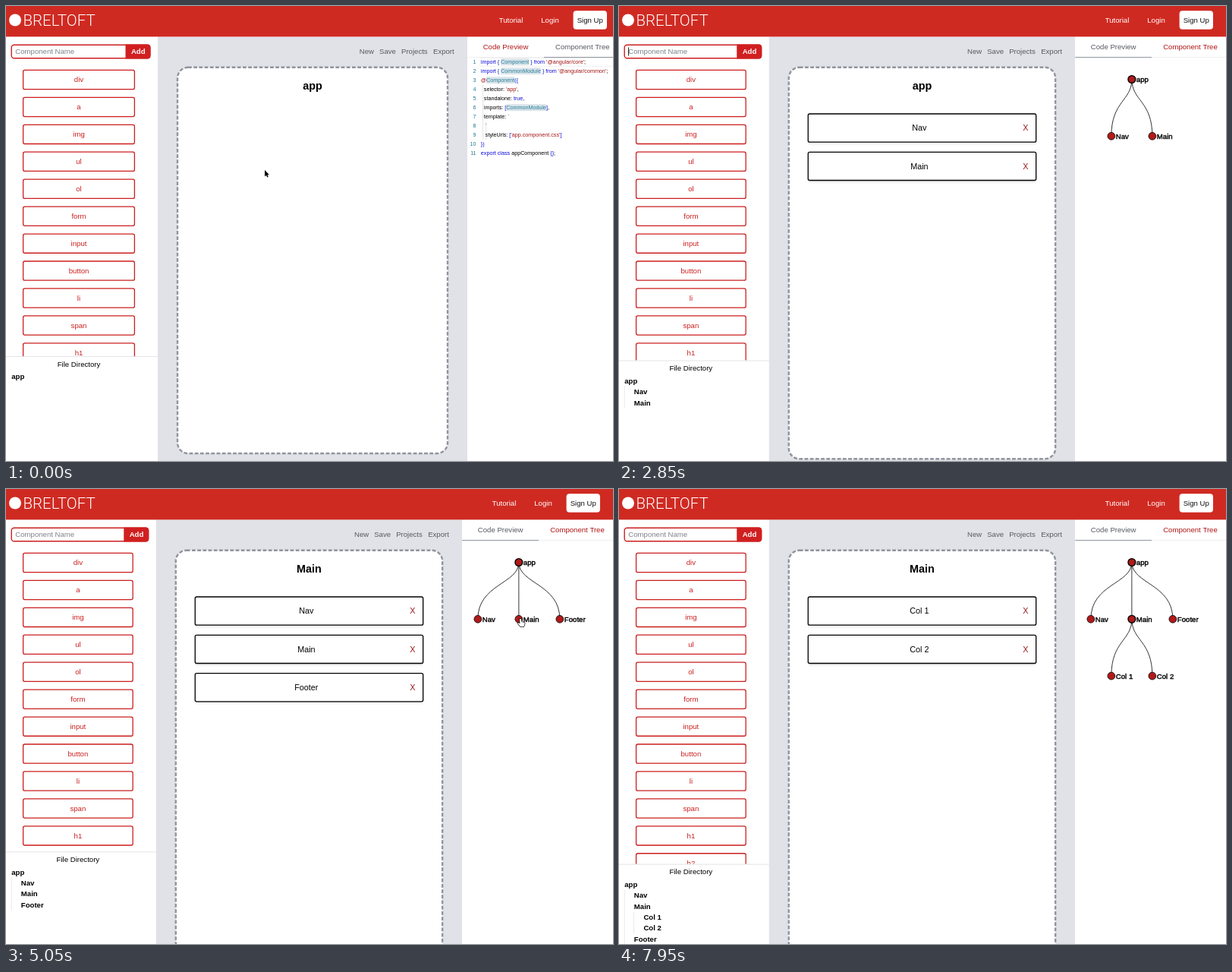
Recreate the animation shown at these times as an HTML page with a canvas. Size 800 by 599 pixels, loop 8 s.

```html
<!DOCTYPE html>
<html lang="en">
<head>
<meta charset="utf-8">
<title>Component builder</title>
<style>
html, body { margin: 0; width: 100%; height: 100%; overflow: hidden; background: #fff; }
canvas { display: block; width: 800px; height: 599px; }
</style>
</head>
<body>
<canvas id="stage"></canvas>
<script>
const LOOP = 8000, WIDTH = 800, HEIGHT = 599;
const SANS = '"Liberation Sans", Arial, sans-serif';
const RED = '#cc1e1e', HEADER = '#cf2a22', GREY = '#565a62', ACTIVE = '#b01818', INK = '#000';
const HEADER_BOTTOM = 40.4, BUTTON_STEP = 35.94, ROW_STEP = 14.38, CARD_STEP = 50.3;
const canvas = document.getElementById('stage');
const ctx = canvas.getContext('2d');
const ratio = window.devicePixelRatio || 1;
canvas.width = WIDTH * ratio;
canvas.height = HEIGHT * ratio;

const TAGS = ['div', 'a', 'img', 'ul', 'ol', 'form', 'input', 'button', 'li', 'span', 'h1', 'h2'];

// Typed names: first key, time between keys, and Enter.
const ENTRIES = [
  { name: 'Nav', start: 1550, step: 100, enter: 1900 },
  { name: 'Main', start: 2400, step: 100, enter: 2850 },
  { name: 'Footer', start: 3250, step: 120, enter: 4000 },
  { name: 'Col 1', start: 6150, step: 110, enter: 6700, parent: 'Main' },
  { name: 'Col 2', start: 7000, step: 110, enter: 7600, parent: 'Main' }
];
const TAB_CLICK = 500, FOCUS = [1050, 2000, 5500], BLUR = 4900;
const NODE_CLICK = 5000, VIEW_SWITCH = 5100;
const PAGE_HEIGHTS = [599, 599, 606.2, 620.6, 635, 642.2];

const MOUSE = [
  [0, 341, 216], [100, 341, 216], [450, 760, 54], [600, 760, 54], [950, 118, 56],
  [4200, 118, 56], [4850, 678, 171], [5150, 678, 171], [5500, 125, 58]
];

// Code tokens: k keyword, t type, s string, p plain.
const CODE = [
  'k:import { |t:Component|k: } from |s:\'@angular/core\'|p:;',
  'k:import { |t:CommonModule|k: } from |s:\'@angular/common\'|p:;',
  's:@|t:Component|k:({',
  'p:  selector: |s:\'app\'|p:,',
  'p:  standalone: |k:true|p:,',
  'p:  imports: |k:[|t:CommonModule|k:]|p:,',
  'p:  template: |s:`',
  's:   `',
  'p:   styleUrls: |k:[|s:\'app.component.css\'|k:]',
  'k:})',
  'k:export class |p:appComponent |k:{}|p:;'
];
const TOKEN = { k: '#0a0ad8', t: '#267f99', s: '#a31515', p: '#000' };

function text(str, x, y, { size = 9.6, color = INK, align = 'left', weight = 400, family = SANS } = {}) {
  ctx.font = `${weight} ${size}px ${family}`;
  ctx.textAlign = align;
  ctx.fillStyle = color;
  ctx.fillText(str, x, y + size * 0.36);
}

function rect(x, y, w, h, color) {
  ctx.fillStyle = color;
  ctx.fillRect(x, y, w, h);
}

function box(x, y, w, h, r, fill, stroke, line = 1.4) {
  ctx.beginPath();
  ctx.roundRect(x, y, w, h, r);
  if (fill) { ctx.fillStyle = fill; ctx.fill(); }
  if (stroke) { ctx.strokeStyle = stroke; ctx.lineWidth = line; ctx.stroke(); }
}

function polygon(points, fill, stroke, line) {
  ctx.beginPath();
  points.forEach(([x, y]) => ctx.lineTo(x, y));
  ctx.closePath();
  ctx.lineJoin = 'round';
  ctx.strokeStyle = stroke;
  ctx.lineWidth = line;
  ctx.stroke();
  ctx.fillStyle = fill;
  ctx.fill();
}

function layoutAt(t) {
  const added = ENTRIES.filter(e => t >= e.enter);
  const width = added.length > 1 ? 791 : 800;
  const height = PAGE_HEIGHTS[added.length];
  return { added, width, height, left: width * 0.25, right: width * 0.76, split: 41 + (height - 41) * 0.753 };
}

function header({ width }) {
  rect(0, 0, WIDTH, HEADER_BOTTOM, HEADER);
  ctx.beginPath();
  ctx.arc(12, 18.5, 8, 0, Math.PI * 2);
  ctx.fillStyle = '#fff';
  ctx.fill();
  text('BRELTOFT', 22.5, 18.7, { size: 20.5, color: '#fff', weight: 300, family: 'Roboto, sans-serif' });
  text('Tutorial', width - 134.5, 18.5, { color: '#fff', align: 'center' });
  text('Login', width - 83, 18.5, { color: '#fff', align: 'center' });
  box(width - 52.4, 6.2, 44.4, 24.6, 4, '#fff');
  text('Sign Up', width - 30.3, 18.5, { color: '#111', align: 'center' });
}

function caretVisible(t) {
  if (t < FOCUS[0] || (t >= BLUR && t < FOCUS[2])) return false;
  let last = 0;
  const mark = time => { if (time <= t) last = Math.max(last, time); };
  FOCUS.forEach(mark);
  for (const e of ENTRIES) {
    for (let i = 0; i < e.name.length; i++) mark(e.start + i * e.step);
    mark(e.enter);
  }
  return Math.floor((t - last) / 250) % 2 === 0;
}

function nameInput(t, { left }) {
  const entry = ENTRIES.find(e => t >= e.start && t < e.enter);
  const typed = entry ? entry.name.slice(0, Math.floor((t - entry.start) / entry.step) + 1) : '';
  box(7.2, 51.2, left - 17.4, 17.6, 3.5, '#fff', RED);
  box(left - 42.5, 50.5, 33, 19, [0, 4, 4, 0], '#d01f20');
  text('Add', left - 25.8, 60, { color: '#fff', weight: 700, align: 'center' });
  text(typed || 'Component Name', 12.3, 60, { color: typed ? INK : '#7d818a' });
  if (caretVisible(t)) {
    ctx.font = `9.6px ${SANS}`;
    rect(12.2 + ctx.measureText(typed).width, 54.5, 0.9, 11, INK);
  }
}

function tagButtons({ left, split }) {
  ctx.save();
  ctx.beginPath();
  ctx.rect(0, 70, left, split - 70);
  ctx.clip();
  TAGS.forEach((tag, i) => {
    const y = 84.4 + i * BUTTON_STEP;
    box(22.6, y, left - 53.2, 25.2, 2.2, '#fff', RED, 1.3);
    text(tag, left / 2 - 4, y + 12.6, { color: RED, align: 'center' });
  });
  ctx.restore();
}

function directory({ left, split, added }) {
  rect(0, split, left, 0.8, '#dcdde1');
  text('File Directory', left / 2 - 4, split + 10, { align: 'center' });
  const rows = [['app', 0]];
  for (const e of added) {
    if (e.parent) continue;
    rows.push([e.name, 1]);
    added.filter(c => c.parent === e.name).forEach(c => rows.push([c.name, 2]));
  }
  rows.forEach(([name, depth], i) => {
    const y = split + 26.8 + i * ROW_STEP;
    for (let d = 0; d < depth; d++) rect(6.8 + d * 12.5, y - 7, 0.7, ROW_STEP, '#dfe0e4');
    text(name, 7.2 + depth * 12.6, y, { weight: 700 });
  });
}

function workspace(t, { left, right, height, added }) {
  const mid = (left + right) / 2;
  rect(left, HEADER_BOTTOM, right - left, HEIGHT - HEADER_BOTTOM, '#e0e2e7');
  const menu = [['New', 142.2], ['Save', 116], ['Projects', 87], ['Export', 45]];
  menu.forEach(([label, offset]) => text(label, right - offset, 60, { color: GREY }));

  box(left + 26, 80.8, right - left - 52, height - 90.8, 14, '#fff');
  ctx.setLineDash([4.8, 2.4]);
  box(left + 26, 80.8, right - left - 52, height - 90.8, 14, null, '#90949d', 2.4);
  ctx.setLineDash([]);

  text(t < NODE_CLICK ? 'app' : 'Main', mid, 105.2, { size: 14.4, weight: 700, align: 'center' });
  const parent = t < VIEW_SWITCH ? undefined : 'Main';
  added.filter(e => e.parent === parent).forEach((e, i) => {
    const y = 142 + i * CARD_STEP;
    ctx.save();
    ctx.shadowColor = 'rgba(0,0,0,.12)';
    ctx.shadowBlur = 3.6 * ratio;
    ctx.shadowOffsetY = 2 * ratio;
    box(left + 51.5, y, right - left - 103, 37.2, 2, '#fff');
    ctx.restore();
    box(left + 51.5, y, right - left - 103, 37.2, 2, null, INK, 1.3);
    text(e.name, mid - 3.6, y + 18.5, { size: 10.8, align: 'center' });
    text('X', right - 65.2, y + 18.5, { size: 10.8, color: '#991b1b', align: 'center' });
  });
}

function codeView({ right }) {
  ctx.strokeStyle = '#eeeeee';
  ctx.lineWidth = 0.8;
  ctx.strokeRect(right + 17, 68.5, 175, 11);
  rect(right + 20.3, 104, 0.6, 72, '#d3d3d3');
  rect(right + 24.3, 152, 0.6, 24, '#d3d3d3');
  CODE.forEach((line, i) => {
    const y = 73.7 + i * 12;
    text(i + 1, right + 11.6, y, { size: 7.2, color: '#237893', align: 'right' });
    let x = right + 17.8;
    for (const token of line.split('|')) {
      const kind = token[0], str = token.slice(2);
      ctx.font = `7.2px ${SANS}`;
      const w = ctx.measureText(str).width;
      if (kind === 't') rect(x, y - 4.5, w, 9, '#dae4ea');
      text(str, x, y, { size: 7.2, color: TOKEN[kind] });
      x += w;
    }
  });
}

function treeView({ right, added }) {
  const nodes = [], links = [];
  const place = (name, x, y, parent) => {
    const children = added.filter(e => e.parent === parent);
    nodes.push([name, x, y, children.length > 0]);
    children.forEach((e, i) => {
      const cx = x + (i - (children.length - 1) / 2) * 54, cy = y + 74.8;
      links.push([x, y, cx, cy]);
      place(e.name, cx, cy, e.name);
    });
  };
  place('app', right + 74.7, 96.5, undefined);

  ctx.strokeStyle = INK;
  ctx.lineWidth = 0.8;
  for (const [x, y, cx, cy] of links) {
    const bend = y + (cy - y) * 0.38;
    ctx.beginPath();
    ctx.moveTo(x, y);
    ctx.bezierCurveTo(x, bend, cx, bend, cx, cy);
    ctx.stroke();
  }
  for (const [name, x, y, branch] of nodes) {
    ctx.beginPath();
    ctx.arc(x, y, 4.9, 0, Math.PI * 2);
    ctx.fillStyle = '#b01a1a';
    ctx.fill();
    ctx.strokeStyle = INK;
    ctx.lineWidth = branch ? 1.4 : 0.8;
    ctx.stroke();
    text(name, x + 6, y + 0.2);
    ctx.lineWidth = 0.4;
    ctx.strokeText(name, x + 6, y + 0.2 + 9.6 * 0.36);
  }
}

function tab(label, x, w, active) {
  text(label, x + w / 2, 53.8, { color: active ? ACTIVE : GREY, align: 'center' });
  rect(x, 67, w, 0.9, active ? '#eceef1' : '#858991');
}

function sidePanel(t, layout) {
  const { right } = layout;
  const tree = t >= TAB_CLICK;
  rect(right, HEADER_BOTTOM, WIDTH - right, HEIGHT - HEADER_BOTTOM, '#fff');
  tab('Code Preview', right, 101, !tree);
  tab('Component Tree', right + 101, 101.6, tree);
  (tree ? treeView : codeView)(layout);
}

function mouseAt(t) {
  const i = MOUSE.findIndex(key => key[0] > t);
  if (i < 0) return MOUSE[MOUSE.length - 1].slice(1);
  const [t0, x0, y0] = MOUSE[i - 1], [t1, x1, y1] = MOUSE[i];
  const p = (t - t0) / (t1 - t0), k = p * p * (3 - 2 * p);
  return [x0 + (x1 - x0) * k, y0 + (y1 - y0) * k];
}

function pointer(t, { left, right }) {
  if ((t >= 1550 && t < 4150) || t >= 6150) return;
  const [x, y] = mouseAt(t);
  ctx.save();
  ctx.translate(x, y);
  if (x < left - 43 && y > 50 && y < 70) {
    ctx.strokeStyle = '#222';
    ctx.lineWidth = 1;
    ctx.beginPath();
    ctx.moveTo(-2, -4.5);
    ctx.quadraticCurveTo(0, -4.5, 0, -3);
    ctx.lineTo(0, 3);
    ctx.quadraticCurveTo(0, 4.5, -2, 4.5);
    ctx.moveTo(2, -4.5);
    ctx.quadraticCurveTo(0, -4.5, 0, -3);
    ctx.moveTo(0, 3);
    ctx.quadraticCurveTo(0, 4.5, 2, 4.5);
    ctx.stroke();
  } else if (x > right + 100 && y < 67 || Math.hypot(x - right - 75, y - 171) < 7) {
    polygon([[-1, 0], [1, 0], [1.5, 4], [5, 4.8], [5.8, 6], [4.5, 10], [0, 10], [-3.5, 6], [-3, 5], [-0.6, 6.2]],
      '#fff', '#111', 1.4);
  } else {
    polygon([[0, 0], [0, 8.5], [1.9, 6.8], [3.2, 9.6], [4.7, 8.9], [3.5, 6.2], [6, 6.2]], '#000', '#fff', 1.4);
  }
  ctx.restore();
}

function draw(t) {
  const layout = layoutAt(t);
  ctx.setTransform(ratio, 0, 0, ratio, 0, 0);
  rect(0, 0, WIDTH, HEIGHT, '#fff');
  workspace(t, layout);
  nameInput(t, layout);
  tagButtons(layout);
  directory(layout);
  sidePanel(t, layout);
  header(layout);
  pointer(t, layout);
}

const begin = performance.now();
function tick() {
  draw((performance.now() - begin) % LOOP);
  requestAnimationFrame(tick);
}
tick();
</script>
</body>
</html>
```
